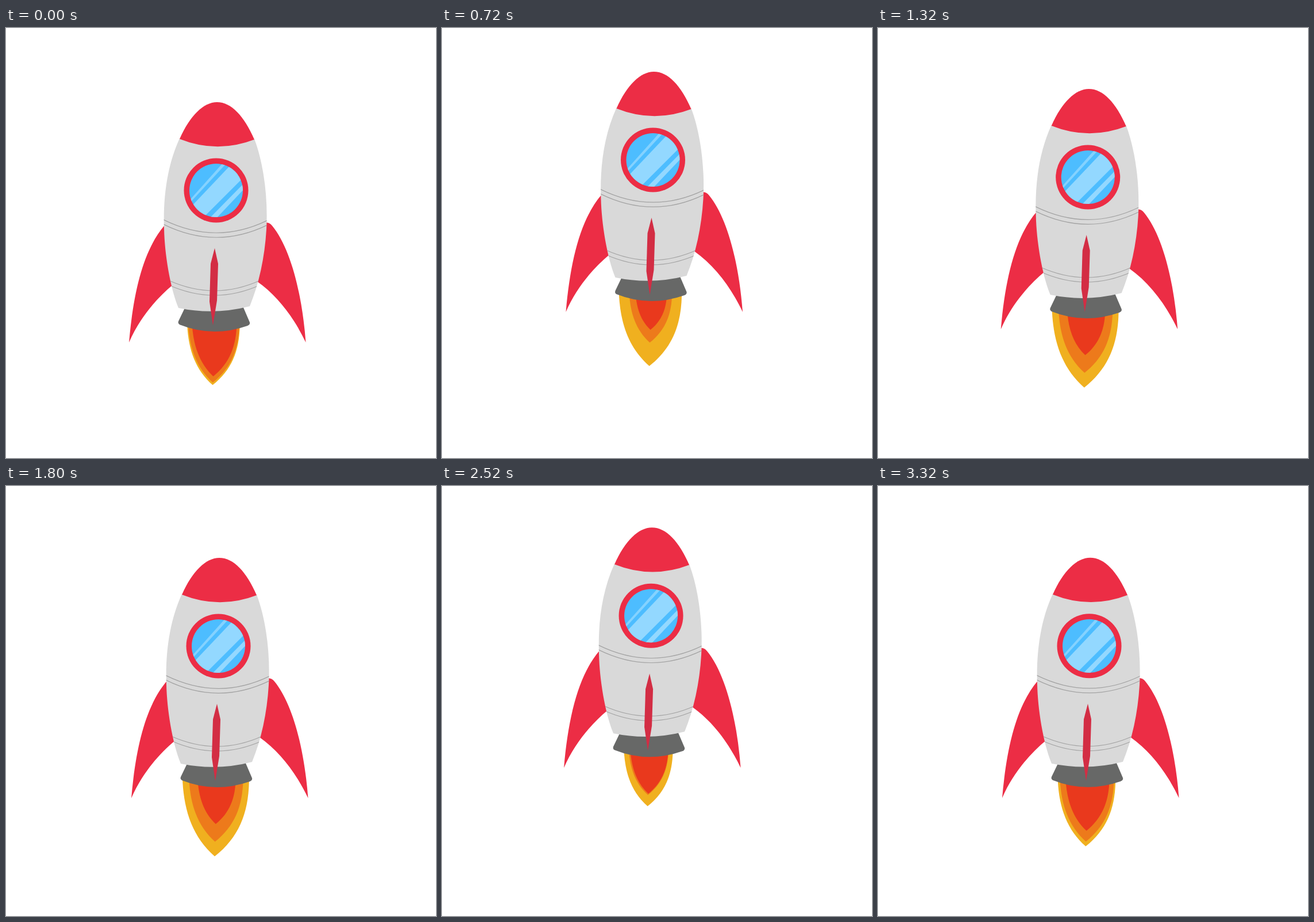
Recreate the animation shown at these times as an HTML page. Size 748x748 px, loop 3360 ms.

```html
<!DOCTYPE html>
<html>
<head>
<meta charset="utf-8">
<style>
html, body { margin: 0; width: 100%; height: 100%; overflow: hidden; background: #fff; }
svg { display: block; width: 100vw; height: 100vh; }
</style>
</head>
<body>
<svg viewBox="0 0 748 748">
  <defs>
    <clipPath id="glass"><circle cx="365.5" cy="282.5" r="46.5"/></clipPath>
    <clipPath id="hull"><use href="#body"/></clipPath>
  </defs>
  <g id="rocket">
    <g id="flames"></g>
    <g fill="#ec2d45">
      <path d="M276 343C240 385 222 455 214 547C232 505 262 470 290 447Z"/>
      <path d="M450 338Q459 338 463 344C495 383 515 462 521.5 547C502 506 474 467 437 441Z"/>
    </g>
    <path fill="#676867" d="M312 485L300 510Q298.500 514 302 516Q360 539 420 518Q425 516 424 512L412 484Z"/>
    <path id="body" fill="#d9d9d9" d="M302 192C280 240 273 295 275 350C276 392 285 450 300 487Q362 500 424 484C440 445 450 400 453 350C456 295 448 235 432 193Z"/>
    <g clip-path="url(#hull)" fill="none" stroke="#a3a3a3" stroke-width="1.2">
      <path d="M273 333Q365 379 456 334M273 341Q365 387 456 342"/>
      <path d="M283 439Q363 475 442 439M283 447Q363 483 442 447"/>
    </g>
    <path fill="#ec2d45" d="M302 193C320 152 344 129 367 129C392 129 414 153 432 194Q367 219 302 193Z"/>
    <circle cx="365.5" cy="282.5" r="56" fill="#ec2d45"/>
    <g clip-path="url(#glass)">
      <path fill="#4dbdff" d="M310 230h110v110h-110z"/>
      <path fill="#84d2ff" d="M378 234L382 237L321 303L318 301Z"/>
      <path fill="#93d8ff" d="M393 236L416 257L342 331L321 312Z"/>
      <path fill="#93d8ff" d="M416 268L416 278L364 333L353 332Z"/>
    </g>
    <path fill="#d32d44" d="M363 383L369 410L367 474L360 517L354 476L356 410Z"/>
  </g>
</svg>
<script>
const FRAME = 40, COUNT = 84, BOB = 42, FLICKER = 12;
const rocket = document.getElementById('rocket');
const wave = (frame, period, peak = 0) => Math.cos((frame - peak) / period * 2 * Math.PI);

// Back to front: centre, base, half width, length, frame of greatest size
const flames = [
  { color: '#f0b01f', x: 361, y: 518, w: 59, h: 133, peak: 8 },
  { color: '#ed7a1b', x: 361.5, y: 515, w: 48, h: 110, peak: 10 },
  { color: '#e9391d', x: 362.5, y: 513, w: 39, h: 93, peak: 0 }
];
for (const f of flames) {
  const { w, h } = f;
  f.node = document.createElementNS('http://www.w3.org/2000/svg', 'path');
  f.node.setAttribute('fill', f.color);
  f.node.setAttribute('d', `M${-w} -4V0C${-w * .95} ${h * .41} ${-w * .68} ${h * .75} -2 ${h}` +
    `C${w * .68} ${h * .75} ${w * .98} ${h * .43} ${w} 0V-4Z`);
  document.getElementById('flames').append(f.node);
}

// Shake: frame, x, y
const shake = [
  [0, 0, 4], [5, 3, -2], [9, -4, 0], [13, 2, -1], [18, 1.5, -1.5], [21, 4, 2], [24, -2, 3],
  [28, 1, .5], [33, -.3, .5], [36, 4, 1], [39, -2, 1], [45, 4, 2.5], [50, -4, 0],
  [54, -2, 2.5], [56, 1, -2], [61, 4, -2], [64, -4, -3], [71, 0, 0], [75, -3, 1],
  [79, 2, -1], [83, 2, 0], [84, 0, 4]
];
function shakeAt(frame) {
  const i = shake.findIndex(p => p[0] > frame);
  const [a, ax, ay] = shake[i - 1], [b, bx, by] = shake[i];
  const u = (frame - a) / (b - a), e = u * u * (3 - 2 * u);
  return [ax + (bx - ax) * e, ay + (by - ay) * e];
}

function draw(time) {
  const frame = Math.floor(time / FRAME) % COUNT;
  const [x, y] = shakeAt(frame);
  rocket.setAttribute('transform', `translate(${x} ${25 * wave(frame, BOB) - 29 + y})`);
  for (const f of flames) {
    const size = .85 + .15 * wave(frame, FLICKER, f.peak);
    f.node.setAttribute('transform', `translate(${f.x} ${f.y}) scale(${size})`);
  }
}

const start = performance.now();
function tick() {
  draw(performance.now() - start);
  requestAnimationFrame(tick);
}
tick();
</script>
</body>
</html>
```
